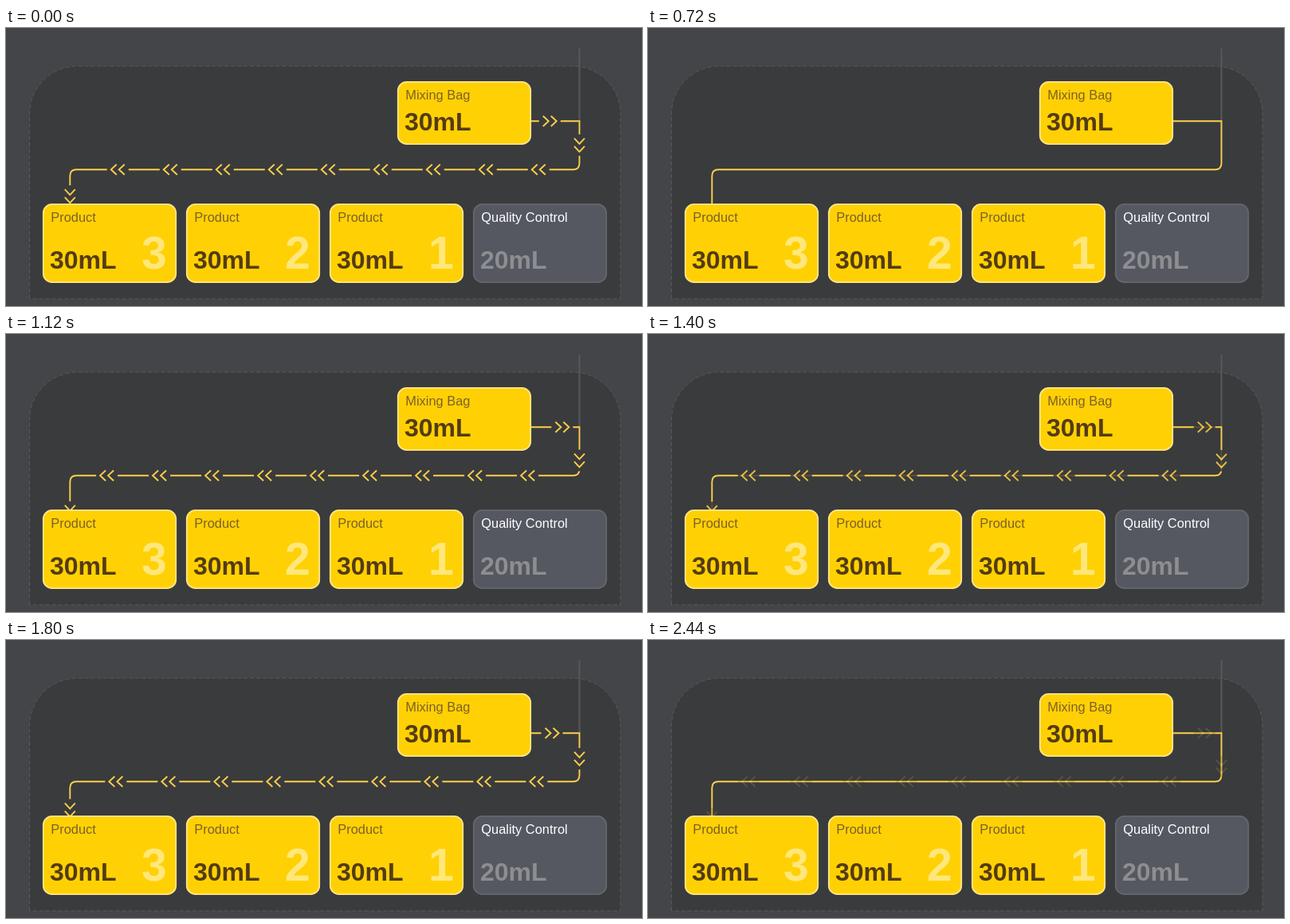
Recreate the animation shown at these times as an HTML page. Size 798x350 px, loop 2480 ms.

```html
<!DOCTYPE html>
<html lang="en">
<head>
<meta charset="utf-8">
<title>Mixing flow</title>
<style>
  html, body { margin: 0; width: 100%; height: 100%; overflow: hidden; background: #444549; }
  svg { display: block; }
  text { font-family: "Liberation Sans", Arial, sans-serif; }
  .label { font-size: 16.4px; fill: #7d5f2a; }
  .volume { font-size: 32px; font-weight: bold; fill: #543b14; }
  .number { font-size: 57px; font-weight: bold; fill: #ffe77c; }
  .card rect { fill: #ffd104; stroke: #ffe68c; stroke-width: 1.8; }
  .idle rect { fill: #555861; stroke: #64666c; }
  .idle .label { fill: #fff; }
  .idle .volume { fill: #8d8e91; }
  .line { fill: none; stroke: #fccf4c; stroke-width: 1.9; }
</style>
</head>
<body>
<svg width="798" height="350" viewBox="0 0 798 350">
  <path d="M29.5 341V108a60 60 0 0 1 60-60H711a60 60 0 0 1 60 60V341Z"
    fill="#3a3b3c" stroke="#57585b" stroke-dasharray="5 3"/>
  <path d="M719.5 26V117" stroke="#58595d" stroke-width="2"/>
  <path class="line" d="M658 117.3H719.5V170.3q0 8-8 8H88.300q-8 0-8 8V222"/>
  <g id="arrows"></g>
  <g id="cards"></g>
</svg>
<script>
const LOOP = 2480, CYCLE = 890, LEAD = 120;
const MOVE = 450, FADE_IN = 100, FADE_START = 600, FADE_END = 815;

const cards = document.getElementById("cards");
const arrowLayer = document.getElementById("arrows");

function addCard(x, y, height, label, volume, number = "", kind = "") {
  const bottom = y + height;
  cards.innerHTML += `<g class="card ${kind}">
    <rect x="${x + 0.8}" y="${y + 0.8}" width="166.400" height="${height - 1.6}" rx="11"/>
    <text class="label" x="${x + 10.3}" y="${y + 23.3}">${label}</text>
    <text class="volume" x="${x + 9}" y="${bottom - 17.7}">${volume}</text>
    <text class="number" x="${x + 124}" y="${bottom - 17.7}">${number}</text>
  </g>`;
}

addCard(491, 67, 80, "Mixing Bag", "30mL");
[3, 2, 1].forEach((n, i) => addCard(46 + 180 * i, 221, 100, "Product", "30mL", n));
addCard(586, 221, 100, "Quality Control", "20mL", "", "idle");

// Resting place, direction and travel of each double chevron
const arrows = [
  { x: 698.3, y: 117.3, angle: 0, travel: 41 },
  { x: 719.5, y: 159.5, angle: 90, travel: 31 },
  { x: 80.3, y: 224.5, angle: 90, travel: 33 },
];
for (let i = 0; i < 9; i++) {
  arrows.push({ x: 126.2 + 66 * i, y: 178.3, angle: 180, travel: 36 });
}
arrowLayer.innerHTML = `<g>
  <path d="M-13.500 0H13.500" stroke="#3a3b3c" stroke-width="4"/>
  <path class="line" d="M-8.500-6.500L-1.500 0L-8.500 6.500M1.500-6.500L8.500 0L1.500 6.500"/>
</g>`.repeat(arrows.length);

const clamp = v => Math.min(1, Math.max(0, v));

function draw(now) {
  const phase = (now % LOOP + LEAD) % CYCLE;
  const remaining = (1 - clamp(phase / MOVE)) ** 3;
  const fadeOut = clamp((FADE_END - phase) / (FADE_END - FADE_START));
  arrowLayer.setAttribute("opacity", Math.min(clamp(phase / FADE_IN), fadeOut));
  arrows.forEach(({ x, y, angle, travel }, i) => {
    arrowLayer.children[i].setAttribute("transform",
      `translate(${x} ${y}) rotate(${angle}) translate(${-travel * remaining} 0)`);
  });
  requestAnimationFrame(draw);
}
draw(0);
</script>
</body>
</html>
```
